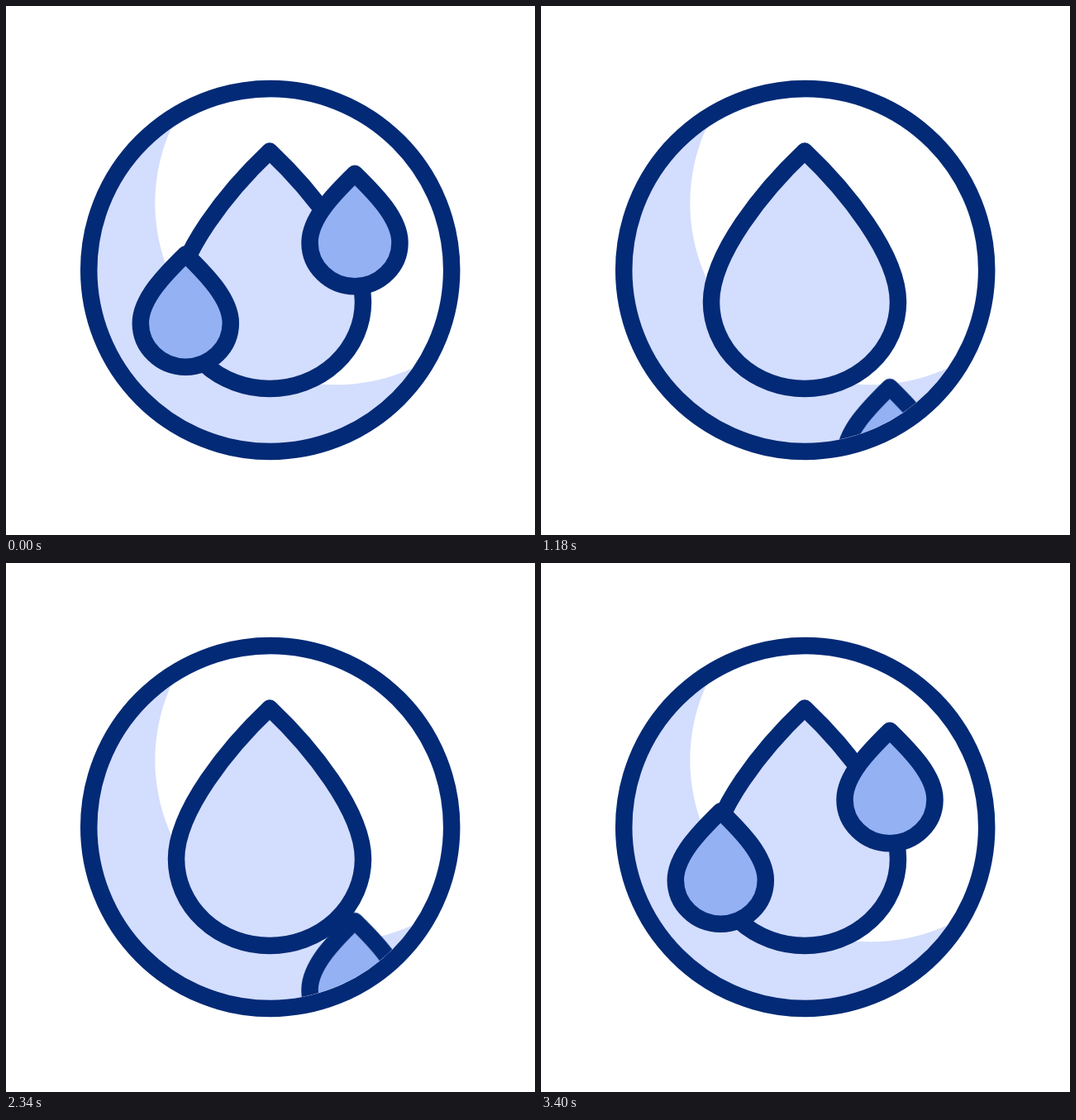
These frames come from a looping animation (640 px wide and 640 px high, 3560 ms). An HTML page:

```html
<!DOCTYPE html>
<html lang="en">
<head>
<meta charset="utf-8">
<title>Water drops</title>
<style>
  html, body { margin: 0; width: 100%; height: 100%; overflow: hidden; background: #fff; }
  svg { display: block; width: 100%; height: 100%; }

  .line { stroke: #032a76; stroke-width: 20.5; stroke-linejoin: round; }
  .light { fill: #d3ddfd; }
  .mid { fill: #93b1f3; }

  .big, .left, .right {
    animation: 3560ms cubic-bezier(.37, 0, .63, 1) infinite;
  }
  .big { transform-origin: 319px 175.6px; animation-name: swing; }
  .left { animation-name: fall-left; }
  .right { animation-name: fall-right; }

  @keyframes swing {
    0%, 7.865% { transform: rotate(0deg); }
    11.573% { transform: rotate(-16.2deg); }
    17.837% { transform: rotate(18.2deg); }
    23.764% { transform: rotate(-17.5deg); }
    29.494% { transform: rotate(16.6deg); }
    33.09%, 100% { transform: rotate(0deg); }
  }

  /* Each drop leaves at the bottom and comes back from the top, twice. */
  @keyframes fall-left {
    0%, 7.865% { transform: translateY(0); }
    29.41% { transform: translateY(230px); }
    29.42%, 32.978% { transform: translateY(-340px); }
    63.315% { transform: translateY(240px); }
    63.325%, 64.045% { transform: translateY(-340px); }
    93.118%, 100% { transform: translateY(0); }
  }

  @keyframes fall-right {
    0%, 7.865% { transform: translateY(0); }
    15.449% { transform: translateY(-48px); }
    39.607% { transform: translateY(318px); }
    39.617% {
      transform: translateY(-246px);
      animation-timing-function: cubic-bezier(.37, .1, .63, 1);
    }
    75.562% { transform: translateY(318px); }
    75.572% { transform: translateY(-270px); }
    95.506%, 100% { transform: translateY(0); }
  }
</style>
</head>
<body>
<svg viewBox="0 0 640 640">
  <defs>
    <clipPath id="inside"><circle cx="319.7" cy="319.5" r="209"/></clipPath>
    <path id="drop" d="M0 0C-24 23.5 -54.5 54 -54.5 83.5A54.5 53 0 0 0 54.5 83.5C54.5 54 24 23.5 0 0Z"/>
  </defs>

  <circle class="light" cx="319.7" cy="319.5" r="215"/>
  <g clip-path="url(#inside)">
    <circle cx="400" cy="238.5" r="219.7" fill="#fff"/>
  </g>
  <!-- white part between the bright disc and the ring -->
  <circle class="line" cx="319.7" cy="319.5" r="219.5" fill="none"/>

  <g clip-path="url(#inside)">
    <path class="big light line" d="M319 175.6C270 222 206 300 206 358A113 105 0 0 0 432 358C432 300 368 222 319 175.6Z"/>
    <g class="left"><use href="#drop" class="mid line" x="217.3" y="300.2"/></g>
    <g class="right"><use href="#drop" class="mid line" x="422" y="202.7"/></g>
  </g>
</svg>
</body>
</html>
```
